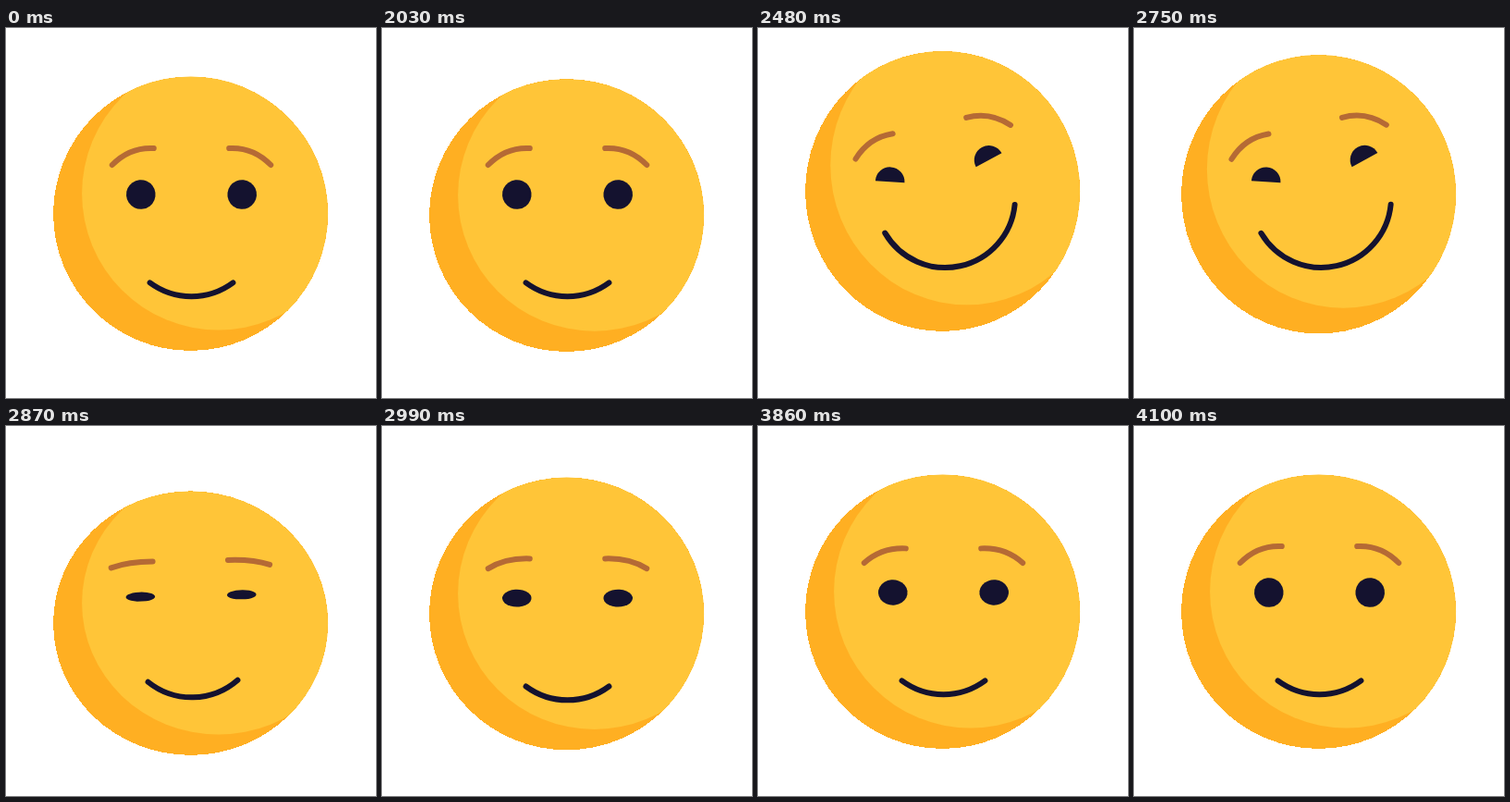
These frames come from a looping animation (400 px wide and 400 px high, 5180 ms). An HTML page:

```html
<!DOCTYPE html>
<html lang="en">
<head>
<meta charset="utf-8">
<title>Smiling face</title>
<style>
  html, body { margin: 0; width: 100%; height: 100%; overflow: hidden; background: #fff; }
  svg { display: block; width: 100%; height: 100%; }
  .line { fill: none; stroke-width: 6; stroke-linecap: round; }
</style>
</head>
<body>
<svg viewBox="0 0 400 400">
  <clipPath id="clip"><ellipse class="head"/></clipPath>
  <ellipse class="head" fill="#ffaf22" shape-rendering="crispEdges"/>
  <g clip-path="url(#clip)"><ellipse id="light" fill="#ffc538"/></g>
  <g id="face">
    <g transform="translate(-54.7 -20.5)">
      <path class="line brow" stroke="#b56a35"/>
      <path class="eye" fill="#14122f"/>
    </g>
    <g transform="translate(54.7 -20.5) scale(-1 1)">
      <path class="line brow" stroke="#b56a35"/>
      <path class="eye" fill="#14122f"/>
    </g>
    <path id="mouth" class="line" stroke="#14122f"/>
  </g>
</svg>
<script>
const LOOP = 5180, STEP = 30, PHASE = 20;
const CX = 199.6, RX = 148.5, EYE = 15.8, SMILE = 75.5;
const DIP = 2120, APEX = 2305, FALL = 2720, LAND = 2875, RECOIL = 3055;
const FACE_LAG = 38;

const $ = s => document.querySelectorAll(s);
const heads = $('.head'), [light] = $('#light'), [face] = $('#face');
const brows = $('.brow'), eyes = $('.eye'), [mouth] = $('#mouth');
const set = (el, attrs) => { for (const k in attrs) el.setAttribute(k, attrs[k]); };

// Sine ease from 0 to 1 between a and b.
const ramp = (t, a, b) => (1 - Math.cos(Math.PI * Math.min(1, Math.max(0, (t - a) / (b - a))))) / 2;

// Rises from a to b, holds, falls from c to d.
const pulse = (t, a, b, c, d) => ramp(t, a, b) - ramp(t, c, d);
const bump = (t, a, b, c) => pulse(t, a, b, b, c);

// Crouch, jump, hang, land, settle.
const hop = (t, dip, up, over) =>
  dip * (bump(t, 2000, DIP, APEX) + bump(t, FALL, LAND, RECOIL)) +
  up * pulse(t, DIP, APEX, FALL, LAND) +
  over * bump(t, LAND, RECOIL, 3230);

const blink = (t, start) => bump(t, start, start + 120, start + 270);

function draw(t) {
  const lift = hop(t, 18, -27.5, -3);
  const top = 52.5 + lift, bottom = 348.9 + hop(t, 7, -21, -1);
  const cy = (top + bottom) / 2, ry = (bottom - top) / 2;
  const rise = Math.max(0, -lift / 27.5);
  heads.forEach(h => set(h, { cx: CX, cy, rx: RX, ry }));
  set(light, { cx: CX + 30 - 3.8 * rise, cy: cy - 21.7 - 6.3 * rise, rx: 147.5, ry: ry - .6 });

  const y = 200.5 + hop(t - FACE_LAG, 10, -26, 0);
  const turn = -12.5 * pulse(t, 2230, 2500, 2750, 2900);
  set(face, { transform: `translate(200.5 ${y}) rotate(${turn})` });

  const open = 1 - .9 * (blink(t, 2050) + blink(t, 2790) + blink(t, 3830));
  brows.forEach(b => set(b, { d: `M-31-32Q-12 ${-32 - 19.5 * open} 14 ${-32 - 18 * open}` }));

  // The lower lid cuts the eye along a tilted chord.
  const squint = pulse(t, 2215, 2450, 2750, 2890);
  const lid = (EYE - .02) * (1 - squint), w = Math.sqrt(EYE * EYE - lid * lid);
  eyes.forEach(e => set(e, {
    d: `M${-w} ${lid}A${EYE} ${EYE} 0 ${lid > .1 ? 1 : 0} 1 ${w} ${lid}Z`,
    transform: `scale(1 ${open}) rotate(${22 * squint - 6})`
  }));

  const laugh = pulse(t, DIP, APEX, 2750, 2900);
  const half = (36.5 + 35.5 * laugh) * Math.PI / 180;
  const mx = SMILE * Math.sin(half), my = 14.2 - 5 * laugh + SMILE * Math.cos(half);
  set(mouth, { d: `M${-mx} ${my}A${SMILE} ${SMILE} 0 0 0 ${mx} ${my}` });
}

const start = performance.now();
function tick() {
  const t = (performance.now() - start) % LOOP;
  draw(Math.floor((t - PHASE) / STEP) * STEP + PHASE);
  requestAnimationFrame(tick);
}
tick();
</script>
</body>
</html>
```
